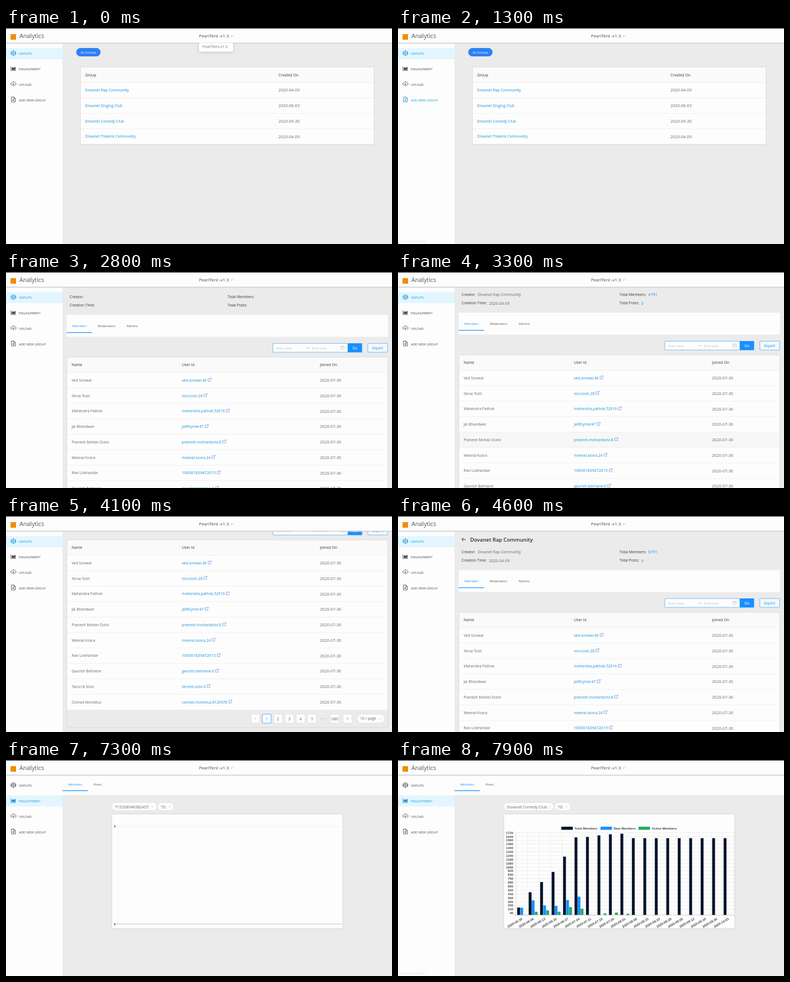
Animation, 690 px wide and 388 px high, one loop 8000 ms. Source, as an HTML page with a canvas:

```html
<!DOCTYPE html>
<html lang="en">
<head>
<meta charset="utf-8">
<title>Analytics dashboard</title>
<style>
html, body { margin: 0; width: 100%; height: 100%; overflow: hidden; background: #ebebeb; }
canvas { display: block; width: 690px; height: 388px; }
</style>
</head>
<body>
<canvas id="stage"></canvas>
<script>
const W = 690, H = 388, LOOP = 8000, ROW = 27.75;
const BLUE = '#1890ff', LINK = '#1c93d8', DARK = '#383838', BODY = '#686868', PALE = '#bfbfbf', PAGE = '#ebebeb';
const SANS = '"Open Sans", "Noto Sans", sans-serif', ARIAL = '"Liberation Sans", Arial, sans-serif';
const APP = 'PearlTent', TEAM = 'Dovanet';

const groups = [
  [TEAM + ' Rap Community', '2020-04-09'],
  [TEAM + ' Singing Club', '2020-06-03'],
  [TEAM + ' Comedy Club', '2020-05-30'],
  [TEAM + ' Theatre Community', '2020-04-09']
];
const members = [
  ['Ved Sonwal', 'ved.sonwal.46'],
  ['Nirva Tosh', 'nira.tosh.28'],
  ['Mahendra Pathok', 'mahendra.pathok.52916'],
  ['Jai Bhandwar', 'JaiRhymer47'],
  ['Pranesh Mohan Dutvi', 'pranesh.mohandutvi.8'],
  ['Meenal Kosra', 'meenal.kosra.24'],
  ['Ravi Lokhandar', '100061839472615'],
  ['Gaurish Belmane', 'gaurish.belmane.6'],
  ['Tarun B Solvi', 'tarunb.solvi.4'],
  ['Conrad Monteluz', 'conrad.monteluz.8120476']
].map(r => [...r, '2020-07-30']);
const admins = [
  ['Nikhil Tamorva', 'nikhil.tamorva', '2020-07-21'],
  ['Omik Vead', '100073915846207', '2020-04-17'],
  [TEAM + ' D', 'dovanet.d.618', '2020-04-10'],
  ['Kunal Vishrod', 'kunalvishrod52', '2020-04-10'],
  ['Balvinder Toor', 'balvinder.gahir', '2020-04-10']
];
const totals = [157, 477, 690, 900, 1220, 1622, 1630, 1663, 1686, 1698];
const fresh = [155, 308, 203, 192, 314, 384, 5];
const active = [5, 70, 99, 70, 168, 134, 6, 35, 52, 29];

const canvas = document.getElementById('stage');
const c = canvas.getContext('2d');
const dpr = window.devicePixelRatio || 1;
canvas.width = W * dpr;
canvas.height = H * dpr;

function text(s, x, y, size, color, { weight = 400, font = SANS, align = 'left' } = {}) {
  c.font = `${weight} ${size}px ${font}`;
  c.textAlign = align;
  c.fillStyle = color;
  c.fillText(s, x, y + size * 0.36);
  return c.measureText(s).width;
}

function rect(x, y, w, h, color) {
  c.fillStyle = color;
  c.fillRect(x, y, w, h);
}

function box(x, y, w, h, r, fill, stroke, width = 0.7) {
  c.beginPath();
  c.roundRect(x, y, w, h, r);
  if (fill) { c.fillStyle = fill; c.fill(); }
  if (stroke) { c.strokeStyle = stroke; c.lineWidth = width; c.stroke(); }
}

// Each path is a flat list of x, y pairs.
function lines(color, width, ...paths) {
  c.strokeStyle = color;
  c.lineWidth = width;
  c.beginPath();
  for (const p of paths)
    for (let i = 0; i < p.length; i += 2) c[i ? 'lineTo' : 'moveTo'](p[i], p[i + 1]);
  c.stroke();
}

function chevron(x, y, color = '#999', r = 2) {
  lines(color, 0.7, [x - r, y - r / 2, x, y + r / 2, x + r, y - r / 2]);
}

function track(t, keys) {
  let [t0, v0] = keys[0];
  if (t <= t0) return v0;
  for (const [t1, v1] of keys) {
    if (t <= t1) return v0 + (v1 - v0) * (t - t0) / (t1 - t0);
    [t0, v0] = [t1, v1];
  }
  return v0;
}

const digitsOnly = s => /^[\d-]+$/.test(s);

const icons = [
  k => {
    lines(k, 0.9, [0, -4.5, 4.3, -2, 4.3, 2, 0, 4.5, -4.3, 2, -4.3, -2, 0, -4.5, 0, -1.5, 4.3, 2],
      [-4.3, 2, 0, -1.5], [-4.3, -2, 0, 1.5, 4.3, -2], [0, 1.5, 0, 4.5]);
  },
  k => {
    lines(k, 0.9, [-4.3, -4, -4.3, 3.5, 4.6, 3.5]);
    c.fillStyle = k;
    c.beginPath();
    for (const [x, y] of [[-3, 2.4], [-3, -0.5], [-1, -2.8], [1, -0.8], [3.8, -3.6], [3.8, 2.4]]) c.lineTo(x, y);
    c.fill();
  },
  k => {
    c.strokeStyle = k;
    c.lineWidth = 0.9;
    c.beginPath();
    c.moveTo(-2, 2.2);
    c.bezierCurveTo(-6, 2, -5, -2, -2.9, -1.6);
    c.bezierCurveTo(-2, -5, 2.2, -5, 2.9, -1.6);
    c.bezierCurveTo(5.5, -1.6, 6, 2, 2, 2.2);
    c.stroke();
    lines(k, 0.9, [0, 4.2, 0, -0.5], [-1.5, 1, 0, -0.7, 1.5, 1]);
  },
  k => {
    lines(k, 0.9, [-3.4, -4.4, 1, -4.4, 3.5, -1.9, 3.5, 4.4, -3.4, 4.4, -3.4, -4.4],
      [0.9, -4.4, 0.9, -1.8, 3.5, -1.8], [-1.7, 1, 1.8, 1], [0, -0.8, 0, 2.8]);
  }
];

function sidebar(selected, hover) {
  rect(0, 28, 101, 360, '#fdfdfd');
  ['GROUPS', 'ENGAGEMENT', 'UPLOAD', 'ADD NEW GROUP'].forEach((label, i) => {
    const y = 46 + i * ROW;
    if (i === selected) rect(0, y - 10, 101, 20, '#e3f6ff');
    const color = i === selected || i === hover ? LINK : '#4a4a4a';
    c.save();
    c.translate(13.2, y - 0.9);
    icons[i](color);
    c.restore();
    text(label, 23, y + 0.2, 5.78, color);
  });
}

function header() {
  rect(0, 0, W, 27, '#fdfdfd');
  rect(0, 0, W, 1, '#1c1c1c');
  rect(0, 26.6, W, 1, '#bdbdbd');
  rect(0, 27.6, W, 0.8, '#dcdcdc');
  rect(8, 11, 10, 10, '#f28c0a');
  text('Analytics', 24, 14.5, 10.7, '#555');
  text(APP + ' -v1.3', 345, 14.2, 7.75, '#444');
  chevron(403.5, 14.4, '#777');
}

function dropdown(alpha) {
  if (alpha <= 0) return;
  c.save();
  c.globalAlpha = alpha;
  c.shadowColor = 'rgba(0,0,0,.18)';
  c.shadowBlur = 5 * dpr;
  c.shadowOffsetY = dpr;
  c.beginPath();
  c.rect(330, 27, 90, 30);
  c.clip();
  box(345, 24, 61, 18.5, 1, '#fff');
  c.shadowColor = 'transparent';
  text(APP + '-v1.3', 351, 33.3, 6.8, '#777');
  c.restore();
}

function groupsPage(linkHover) {
  box(125.5, 36, 43.5, 15, 7.5, '#2c80f6');
  text('All Groups', 147.3, 43.7, 5.75, '#fff', { align: 'center' });
  rect(133, 70, 525, 139, '#fdfdfd');
  rect(133, 70, 525, 28, '#fafafa');
  text('Group', 141.5, 84.3, 6.75, DARK);
  text('Created On', 487, 84.3, 6.75, DARK);
  groups.forEach(([name, date], i) => {
    const y = 111.8 + i * ROW;
    lines('#e8e8e8', 0.6, [133, y - 14, 658, y - 14]);
    text(name, 141.5, y, 6.73, linkHover && !i ? '#4fb4ee' : LINK);
    text(date, 487, y, 7.25, BODY);
  });
  box(133, 70, 525, 139, 1, null, '#cfcfcf');
}

function linkIcon(x, y) {
  lines('#7088dc', 0.7, [x + 2.6, y - 2.2, x, y - 2.2, x, y + 2.7, x + 4.9, y + 2.7, x + 4.9, y + 0.4],
    [x + 2.2, y + 0.4, x + 5.6, y - 2.9], [x + 3.4, y - 2.9, x + 5.6, y - 2.9, x + 5.6, y - 0.8]);
}

function field(label, value, x, y, color) {
  const w = text(label + ':', x, y, 6.65, DARK);
  if (value) text(value, x + w + 3.6, y, digitsOnly(value) ? 7.1 : 6.65, color);
}

function pageButton(label, x, y, on) {
  box(x, y - 8, 15.8, 16, 1.5, '#fdfdfd', on ? BLUE : '#d9d9d9');
  const mid = x + 7.9, way = { '<': -1, '>': 1 }[label];
  if (way) lines(label === '<' ? PALE : '#777', 0.8, [mid - way, y - 2.4, mid + way * 1.4, y, mid - way, y + 2.4]);
  else text(label, mid, y, 7, on ? BLUE : BODY, { align: 'center' });
}

function pagination(y, many) {
  if (!many) return ['<', '1', '>'].forEach((s, i) => pageButton(s, 626 + i * 20.2, y, s === '1'));
  ['<', '1', '2', '3', '4', '5', '', '680', '>'].forEach((s, i) => {
    const x = 438 + i * 20.2 + (i > 7 ? 3 : i > 6 ? 0.6 : 0);
    if (s) pageButton(s, x, y, s === '1');
    else for (let d = -1; d < 2; d++) rect(x + 7.2 + d * 3.8, y - 0.7, 1.5, 1.5, PALE);
  });
  box(627.5, y - 8, 50, 16, 8, '#fdfdfd', '#d9d9d9');
  text('10 / page', 633, y, 6.7, BODY);
  chevron(669.5, y, PALE);
}

function toolbar() {
  box(477, 148.3, 134, 15.8, 1, '#fdfdfd', '#46a4f2');
  text('Start date', 483, 156.3, 6.15, PALE);
  lines(PALE, 0.7, [536, 156.5, 543, 156.5, 541, 154.8]);
  text('End date', 547.5, 156.3, 6.15, PALE);
  box(598.5, 153.5, 6.3, 5.5, 0.5, null, PALE);
  lines(PALE, 0.7, [598.5, 155.5, 604.8, 155.5], [600.2, 152.5, 600.2, 154], [603.1, 152.5, 603.1, 154]);
  rect(611, 148, 25.5, 16.4, BLUE);
  text('Go', 623.8, 156.3, 6.9, '#fff', { align: 'center' });
  box(646.8, 148.3, 35.4, 15.8, 1, '#f3f8fc', '#46a4f2');
  text('Export', 664.5, 156.3, 6.35, BLUE, { align: 'center' });
}

function tabStrip(labels, x, y, activeIndex) {
  let at = x;
  labels.forEach((s, i) => {
    at += text(s, at, y, 5.68, i === activeIndex ? BLUE : '#555') + 20.2;
  });
}

function detailPage(t) {
  const scroll = track(t, [[3200, 20], [3300, 24], [3400, 68], [3500, 112], [3600, 130], [4100, 130], [4300, 75], [4500, 15], [4600, 0]]);
  const tab = t < 4800 ? 0 : t < 5300 ? 1 : 2;
  const loaded = t >= 2900;
  const rows = tab === 0 ? (t < 2300 ? [] : members) : tab === 2 && t >= 5400 ? admins : admins.slice(1, 4);
  const cols = tab === 0 ? [117.3, 314.2, 561.2] : [117.3, 298.2, 537.5];
  c.save();
  c.translate(0, -scroll);

  if (loaded) {
    lines('#333', 1, [120.8, 42, 114, 42], [117, 39, 114, 42, 117, 45]);
    text(groups[0][0], 129, 42.8, 9.3, '#2c2c2c', { weight: 600 });
  }
  field('Creator', loaded && groups[0][0], 113.8, 64.3, BODY);
  field('Creation Time', loaded && '2020-04-09', 113.8, 80, BODY);
  field('Total Members', loaded && '6791', 396, 64.3, BLUE);
  field('Total Posts', loaded && '0', 396, 80, BLUE);

  rect(108.5, 97, 574.5, 39.5, '#fdfdfd');
  tabStrip(['Members', 'Moderators', 'Admins'], 118.8, 117.2, tab);
  const inkX = track(t, [[4700, 108.5], [4900, 154], [5200, 154], [5400, 205]]);
  const inkW = track(t, [[4700, 45.5], [4900, 51], [5200, 51], [5400, 41]]);
  rect(inkX, 128.2, inkW, 1.2, BLUE);
  toolbar();

  const end = 200.5 + Math.max(rows.length, 1) * ROW;
  rect(108.8, 172.8, 573.8, end - 172.8, '#fdfdfd');
  rect(108.8, 172.8, 573.8, 27.7, '#fafafa');
  ['Name', 'User Id', 'Joined On'].forEach((s, i) => text(s, cols[i], 186.7, 6.8, DARK));
  rows.forEach(([name, id, date], i) => {
    const y = 214.4 + i * ROW;
    if (i === 4 && t >= 3300 && t < 3500) rect(109, y - 13.9, 573.4, ROW, '#f7f7f7');
    lines('#e8e8e8', 0.6, [108.8, y - 13.9, 682.6, y - 13.9]);
    text(name, cols[0], y, 6.63, BODY);
    const w = text(id, cols[1], y, digitsOnly(id) ? 7.1 : 6.7, LINK);
    linkIcon(cols[1] + w + 2.6, y - 0.9);
    text(date, cols[2], y, 7.3, BODY);
  });
  if (rows.length) pagination(end + 16, tab === 0);
  box(108.8, 172.8, 573.8, end + 32 - 172.8, 1, null, '#d2d2d2');
  c.restore();
}

function select(label, x, w) {
  box(x, 76.2, w, 15, 7.5, '#fdfdfd', '#d4d4d4');
  text(label, x + 5.5, 84, digitsOnly(label) ? 7.1 : 6.95, BODY);
  chevron(x + w - 7.5, 84, PALE);
}

const chartText = (s, x, y, align, color = '#4a4a4a') => text(s, x, y, 5.85, color, { weight: 700, font: ARIAL, align });

function emptyChart() {
  c.setLineDash([2, 1]);
  lines('#e0e0e0', 0.6, [197, 119.5, 600.5, 119.5], [200.8, 119.5, 200.8, 297]);
  c.setLineDash([]);
  lines('#bdbdbd', 0.9, [197, 294.6, 600.5, 294.6]);
  chartText('2', 196, 119.3, 'right');
  chartText('0', 196, 294.4, 'right');
}

function barChart(grow) {
  const left = 211, base = 278.6, step = 20.5, unit = 0.0861, bar = 5.4;
  const series = [
    ['Total Members', 292, '#04142c', totals],
    ['New Members', 362, BLUE, fresh],
    ['Active Members', 430, '#27ab62', active]
  ];
  for (let v = 40; v <= 1720; v += 80) {
    const y = base - v * unit;
    lines('#e4e4e4', 0.6, [208, y, 600.5, y]);
    chartText(v, 206, y, 'right');
  }
  for (let i = 0; i <= 19; i++) {
    const x = left + i * step;
    lines(i ? '#e8e8e8' : '#cfcfcf', 0.6, [x, base - 1720 * unit, x, base + 3]);
    if (i === 19) break;
    const day = new Date(Date.UTC(2020, 4, 30 + 7 * i)).toISOString().slice(0, 10);
    c.save();
    c.translate(x + step / 2, base + 5.4);
    c.rotate(-Math.PI / 6);
    chartText(day, 0, 1, 'right');
    c.restore();
  }
  series.forEach(([label, x, color, values], s) => {
    rect(x, 119.8, 20.5, 5.6, color);
    chartText(label, x + 23.5, 122.6, 'left');
    for (let i = 0; i < 19; i++) {
      const h = (values[i] ?? (s ? 0 : 1605)) * unit * grow;
      rect(left + i * step + 2.1 + s * bar, base - h, bar - 0.3, h, color);
    }
  });
  lines('#bdbdbd', 0.7, [208, base, 600.5, base]);
}

function engagementPage(t) {
  const ready = t >= 7400;
  rect(101, 28, 589, 35, '#fdfdfd');
  tabStrip(['Members', 'Posts'], 111.2, 43.6, 0);
  rect(101, 54.4, 45.5, 1.3, BLUE);
  select(ready ? groups[2][0] : '715208946382457', 189, ready ? 89.5 : 81);
  select('7D', ready ? 279.8 : 271, 29);
  box(189, 97, 413, 206, 1, '#fdfdfd', '#c9c9c9');
  if (ready) barChart(1 - (1 - (t - 7400) / 500) ** 4);
  else emptyChart();
}

function menuHover(t) {
  if (t >= 700 && t < 1100 || t >= 6900 && t < 7200) return 1;
  if (t >= 1100 && t < 1300) return 2;
  return t >= 1300 && t < 1700 ? 3 : -1;
}

function draw(t) {
  c.setTransform(dpr, 0, 0, dpr, 0, 0);
  rect(0, 0, W, H, PAGE);
  if (t < 2100) groupsPage(t >= 1700);
  else if (t < 7200) detailPage(t);
  else engagementPage(t);
  sidebar(t < 7200 ? 0 : 1, menuHover(t));
  header();
  dropdown(track(t, [[0, 1], [100, 0.6], [200, 0.25], [300, 0]]));
  if (menuHover(t) > 0 || t >= 7800) text('localhost:3000/chart', 2, 383.3, 5, '#dcdcdc');
}

function tick(now) {
  draw(Math.floor(now % LOOP / 100) * 100);
  requestAnimationFrame(tick);
}
draw(0);
const start = performance.now();
requestAnimationFrame(() => tick(performance.now() - start));
</script>
</body>
</html>
```
